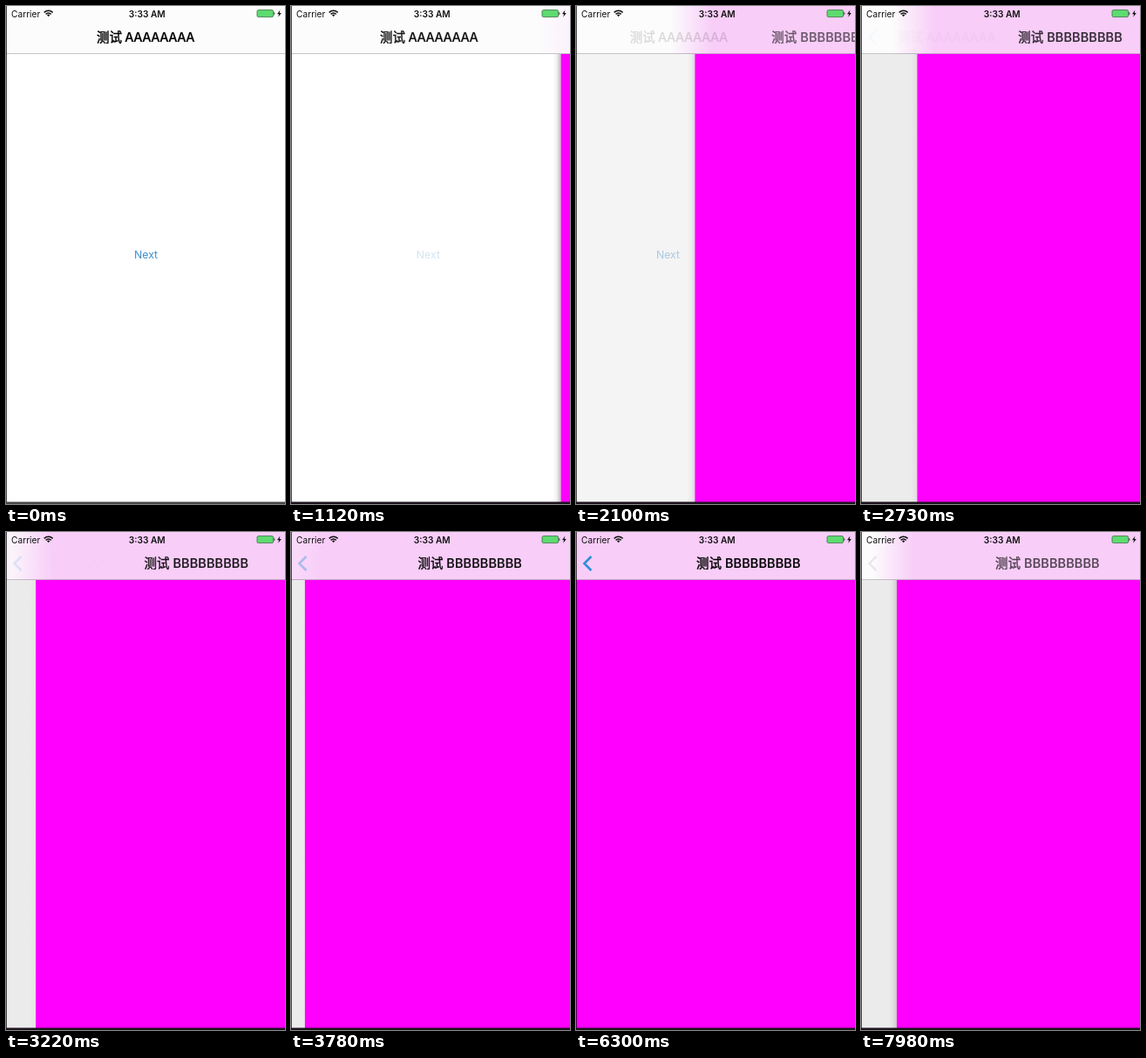
Write an HTML page that moves like this. It is 320x570 px and loops after 8000 ms.

```html
<!DOCTYPE html>
<html lang="zh">
<head>
<meta charset="utf-8">
<title>Push transition</title>
<style>
  html, body { margin: 0; width: 100%; height: 100%; overflow: hidden; background: #fff; }
  svg { display: block; width: 320px; height: 570px; }
  text { font-family: Inter, "Noto Sans CJK SC", sans-serif; white-space: pre; }
  .status { font-size: 10.2px; fill: #111; }
  .title { font-size: 14.5px; font-weight: 500; stroke: #000; stroke-width: .2; }
  .cjk { font-family: "Noto Sans CJK SC", "Noto Sans CJK", sans-serif; letter-spacing: 0; stroke-width: .4; }
  #titleA { letter-spacing: -.5px; }
  #titleB { letter-spacing: .1px; }
</style>
</head>
<body>
<svg viewBox="0 0 320 570">
  <defs>
    <linearGradient id="blur" gradientUnits="userSpaceOnUse">
      <stop id="barLeft"/>
      <stop id="barRight" offset="1"/>
    </linearGradient>
    <linearGradient id="fade">
      <stop stop-color="#000" stop-opacity="0"/>
      <stop offset=".5" stop-color="#000" stop-opacity=".25"/>
      <stop offset="1" stop-color="#000"/>
    </linearGradient>
  </defs>

  <rect width="320" height="570" fill="#fff"/>
  <text id="next" x="147" y="288.9" font-size="12.3" fill="#3a90cc">Next</text>
  <rect id="dim" y="54" width="320" height="516"/>
  <g id="page">
    <rect id="shadow" x="-9" y="54" width="9" height="516" fill="url(#fade)"/>
    <rect y="54" width="321" height="516" fill="#f0f"/>
  </g>

  <rect width="320" height="55" fill="url(#blur)"/>
  <rect y="54" width="320" height="1" fill="#000" fill-opacity=".22"/>
  <text id="titleA" class="title" y="41"><tspan class="cjk">测试</tspan> AAAAAAAA</text>
  <text id="titleB" class="title" y="41"><tspan class="cjk">测试</tspan> BBBBBBBBB</text>
  <path id="back" d="M17.5 28 9.5 36 17.5 44" fill="none" stroke-width="2.6"/>

  <text class="status" x="6" y="12.6">Carrier</text>
  <text class="status" x="140.7" y="12.6" font-weight="600">3:33 AM</text>
  <g fill="none" stroke="#111" stroke-width="1.5">
    <path d="M43.7 7.4Q48.7 3 53.7 7.4M45.6 9.4Q48.7 6.7 51.8 9.4"/>
    <path d="M47 10.2Q48.7 9 50.4 10.2L48.7 12.2Z" fill="#111" stroke="none"/>
  </g>
  <rect x="288" y="4.6" width="18.6" height="8" rx="1.6" fill="#5ddb70" stroke="#3d6b45" stroke-width=".8"/>
  <path d="M307.4 7h.6q.8 1.6 0 3.2h-.6z" fill="#333"/>
  <path d="M314.4 4.6 311 9.2h2.1l-.9 3.6 3.6-4.8h-2.2z" fill="#111"/>

  <rect width="1" height="570" fill="#000" fill-opacity=".7"/>
  <rect id="base" y="567.5" width="320" height="2.5"/>
</svg>
<script>
const LOOP = 8000, STEP = 70, PUSH = 953, PUSH_END = 6300, POP = 7611;
const $ = id => document.getElementById(id);
const set = (id, attrs) => {
  for (const k in attrs) $(id).setAttribute(k, attrs[k]);
};
const clamp = v => Math.min(1, Math.max(0, v));
const mix = (a, b, k) => `rgb(${a.map((v, i) => v + (b[i] - v) * k)})`;

// critically damped spring: share of the way still to go
const spring = ms => {
  const y = Math.max(0, ms) * 0.00168;
  return (1 + y) * Math.exp(-y);
};

// piecewise linear curve through [x, y] points
const curve = (pts, x) => {
  const i = Math.max(1, pts.findIndex(p => p[0] >= x));
  const [a, b] = [pts[i - 1], pts[i]];
  return a[1] + (b[1] - a[1]) * (x - a[0]) / (b[0] - a[0]);
};
const slideA = [[0, 0], [.26, 15], [.8, 62], [.953, 76], [1, 80]];
const slideB = [[0, 0], [.014, 0], [.048, 7], [.2, 42], [.741, 148], [1, 200]];

const PALE = [252, 252, 252], PINK = [248, 205, 248];

function draw(t) {
  const popping = t >= POP;
  const rest = popping ? 1 - spring(t - POP) : t >= PUSH_END ? 0 : spring(t - PUSH);
  const done = 1 - rest, edge = 320 * rest;

  set('page', { transform: `translate(${edge} 0)` });
  set('shadow', { opacity: popping ? .15 : done && .27 * rest });
  set('dim', { width: edge, opacity: .08 * clamp((done - .25) / .6) * clamp(edge / 12) });
  set('next', {
    x: 147 - 96 * done,
    opacity: t < PUSH ? 1 : clamp(.2 + .8 * (t - PUSH) / 4700)
  });

  set('blur', { x1: edge - 28, x2: edge + 20 });
  set('barLeft', { 'stop-color': mix(PINK, PALE, clamp(edge / 40)) });
  set('barRight', { 'stop-color': mix(PALE, PINK, clamp((320 - edge) / 40)) });

  set('titleA', { x: 104 - curve(slideA, done), opacity: popping ? 0 : rest ** 2.4 });
  set('titleB', {
    x: 138 + (popping ? 125 * rest : curve(slideB, rest)),
    opacity: popping ? done ** 3 : done
  });

  const shown = clamp((t - 2300) / 2400) ** 2;
  set('back', {
    opacity: popping ? .25 - rest : shown,
    stroke: popping ? '#668' : '#2f8fdc'
  });
  set('base', { fill: t < PUSH ? '#484848' : '#1c121c' });
}

function tick() {
  const t = performance.now() % LOOP;
  draw(Math.floor(t / STEP) * STEP);
  requestAnimationFrame(tick);
}
tick();
</script>
</body>
</html>
```
